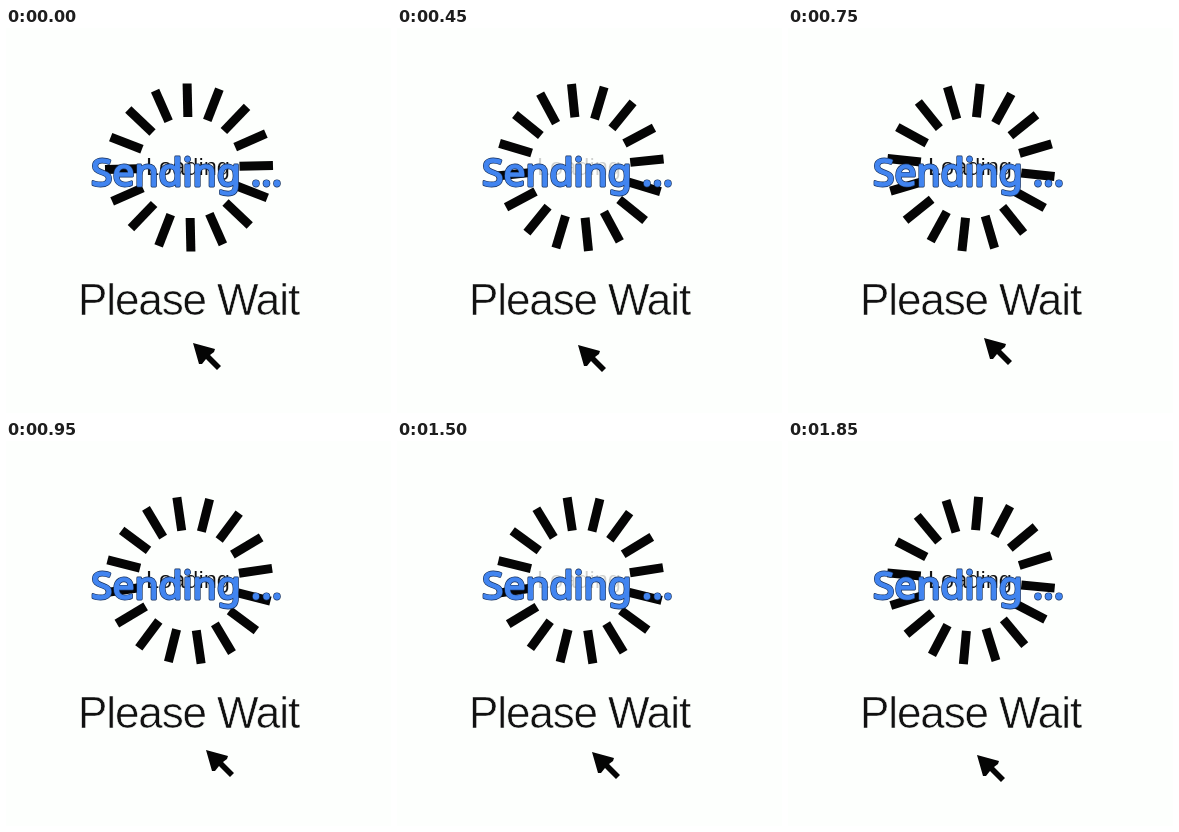
Animation, 385 px wide and 385 px high, one loop 1.9 s. Source, as an HTML page:

```html
<!DOCTYPE html>
<html lang="en">
<head>
<meta charset="utf-8">
<title>Please Wait</title>
<style>
  html, body { margin: 0; width: 100%; height: 100%; overflow: hidden; background: #fdfffd; }
  svg { display: block; width: 385px; height: 385px; }
  .plain { font-family: "Liberation Sans", Arial, sans-serif; fill: #111; stroke: #fdfffd; }
  .wait { font-size: 44px; letter-spacing: -1.1px; stroke-width: .6px; }
  .loading { font-size: 23.6px; stroke-width: .2px; }
  .sending { font: 400 39px "Noto Sans", "Open Sans", sans-serif; stroke-linejoin: round; }
  .edge { fill: #16305c; stroke: #16305c; stroke-width: 2.8px; }
  .face { fill: #4285f0; stroke: #4285f0; stroke-width: 1.5px; }
</style>
</head>
<body>
<svg viewBox="0 0 385 385">
  <defs><text id="sending" class="sending" x="85" y="158">Sending ...</text></defs>
  <text id="loading" class="plain loading" x="140" y="147">Loading</text>
  <g id="spinner" fill="#050505"></g>
  <use href="#sending" class="edge"/>
  <use href="#sending" class="face"/>
  <text class="plain wait" x="72" y="287">Please Wait</text>
  <path id="cursor" fill="#050505" d="M0 0L22 6 21 9 17 12 28 23 24 27 13 16 9 21 6 21z"/>
</svg>
<script>
  const LOOP = 1900, STEP = 50, BARS = 16, BLINK = 1050;
  const { cos, abs, min, floor, round, PI } = Math;
  const $ = id => document.getElementById(id);

  for (let i = 0; i < BARS; i++) {
    const bar = document.createElementNS("http://www.w3.org/2000/svg", "rect");
    const attrs = { x: -4.5, y: -84, width: 9, height: 33.5, transform: `rotate(${i * 360 / BARS})` };
    for (const name in attrs) bar.setAttribute(name, attrs[name]);
    $("spinner").append(bar);
  }

  // Steady turn of 2 degrees per step.
  const turn = t => t / 25 - 1.3;

  // Full strength, with one short dip per blink.
  const fade = t => min(1, abs(t % BLINK - 480) / 160);

  // The pointer sways along a shallow diagonal.
  function sway(t) {
    const a = 2 * PI * t / LOOP;
    const dx = 4.1 * cos(2 * a + .92) - 9.2 * cos(a - PI / 4);
    return [round(191 + dx), round(312.7 - .45 * dx)];
  }

  function draw(now) {
    const t = floor(now % LOOP / STEP) * STEP;
    $("spinner").setAttribute("transform", `translate(183 139.5) rotate(${turn(t)})`);
    $("loading").setAttribute("opacity", fade(t));
    $("cursor").setAttribute("transform", `translate(${sway(t)})`);
  }

  const start = performance.now();
  function tick() {
    draw(performance.now() - start);
    requestAnimationFrame(tick);
  }
  tick();
</script>
</body>
</html>
```
